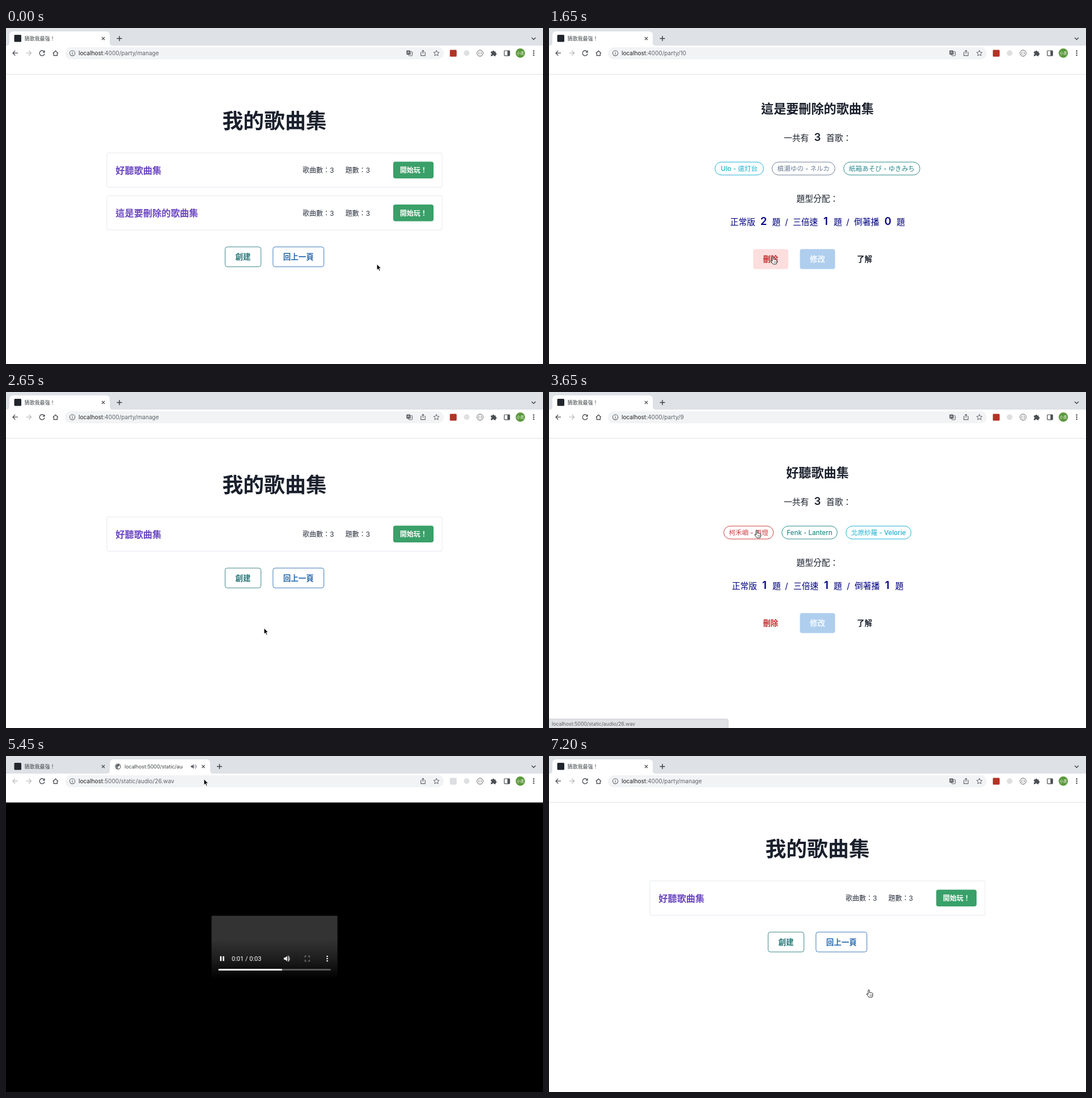
An HTML page that plays this animation: 947 by 592 pixels, repeating every 7.8 s.

```html
<!DOCTYPE html>
<html lang="zh-Hant">
<head>
<meta charset="utf-8">
<title>猜歌我最強！</title>
<style>
html, body { margin: 0; width: 100%; height: 100%; overflow: hidden; background: #fff; }
svg { display: block; width: 100%; height: 100%; }
text { font-family: Inter, "Noto Sans CJK TC", "Noto Sans CJK", sans-serif; white-space: pre; }
.media { font-family: Roboto, sans-serif; }
</style>
</head>
<body>
<svg id="stage" viewBox="0 0 947 592"></svg>
<script>
const LOOP = 7800, STEP = 50;
const INK = '#1a202c', ICON = '#5f6368', TEAL = '#2c7a7b', CYAN = '#1fb2d2';

// ---- drawing helpers ----
const text = (x, y, size, str, fill = INK, weight = 400, anchor = 'start', more = '') =>
  `<text x="${x}" y="${y}" font-size="${size}" fill="${fill}" font-weight="${weight}" text-anchor="${anchor}" ${more}>${str}</text>`;
const mid = (x, y, size, str, fill, weight) => text(x, y, size, str, fill, weight, 'middle');
const rect = (x, y, w, h, r, fill, more = '') =>
  `<rect x="${x}" y="${y}" width="${w}" height="${h}" rx="${r}" fill="${fill}" ${more}/>`;
const box = (x, y, w, h, r, color, width = 1) =>
  rect(x, y, w, h, r, 'none', `stroke="${color}" stroke-width="${width}"`);
const line = (d, color = ICON, width = 1.3, more = '') =>
  `<path d="${d}" fill="none" stroke="${color}" stroke-width="${width}" ${more}/>`;
const fill = (d, color = ICON, more = '') => `<path d="${d}" fill="${color}" ${more}/>`;
const dot = (x, y, r, color, more = '') => `<circle cx="${x}" cy="${y}" r="${r}" fill="${color}" ${more}/>`;
const ring = (x, y, r, color = ICON, width = 1.1) =>
  dot(x, y, r, 'none', `stroke="${color}" stroke-width="${width}"`);
const group = (id, body, more = '') => `<g id="${id}" ${more}>${body}</g>`;
const cross = (x, y, r) => line(`M${x - r} ${y - r}l${2 * r} ${2 * r}m0 ${-2 * r}l${-2 * r} ${2 * r}`, '#3c4043', 1.2);
const dots = (x, y, gap, color) => [-gap, 0, gap].map(d => dot(x, y + d, 1.3, color)).join('');
const tabShape = (x, w) =>
  `M${x - 5} 31Q${x} 31 ${x} 26V13Q${x} 6 ${x + 7} 6H${x + w - 7}Q${x + w} 6 ${x + w} 13V26Q${x + w} 31 ${x + w + 5} 31Z`;

// ---- browser frame ----
function star(x, y, r) {
  let d = '';
  for (let i = 0; i < 10; i++) {
    const a = i * Math.PI / 5, k = i % 2 ? r * .45 : r;
    d += `${i ? 'L' : 'M'}${(x + k * Math.sin(a)).toFixed(1)} ${(y - k * Math.cos(a)).toFixed(1)}`;
  }
  return d + 'Z';
}

const chrome = rect(0, 0, 947, 31, 0, '#dee1e6') +
  fill(tabShape(6, 177), '#fff', 'id="tab"') +
  group('favicon', rect(14.5, 12, 12.5, 12.5, 1.5, '#20262c')) +
  group('loader', line('M20.5 13.5A5 5 0 1 1 15.5 18.5', '#3f7de0', 1.6)) +
  text(32.5, 21.6, 9, '猜歌我最強！', '#3c4043') + cross(171.5, 18.5, 2.6) +
  group('tab2',
    ring(197.5, 18.5, 4.6, ICON, 1.2) + fill('M193.5 17l4-3 3 1-1 3-3 1 1 3-2 1z') +
    text(209, 21.5, 8.9, 'localhost:5000/static/audio/26', '#3c4043') +
    rect(318, 10, 20, 16, 0, 'url(#fade)') +
    group('sound', rect(312, 10, 26, 16, 0, '#fff') + fill('M326 17h2l3-2.6v8.2l-3-2.6h-2z') +
      line('M332.5 16.4q2 2.1 0 4.2m1.4-6q3.6 3.9 0 7.8', ICON, .9)) +
    cross(348, 18.5, 2.6)) +
  group('plus', line('M-4.5 18.5h9m-4.5-4.5v9', '#3c4043', 1.4)) +
  line('M927 17l3.5 3.3 3.5-3.3', '#3c4043', 1.3) +
  rect(0, 31, 947, 51, 0, '#fff') +
  group('back', line('M21 44.2H12m4.2-4.3L12 44.2l4.2 4.3', 'currentColor')) +
  line('M35.5 44.2h9m-4.2-4.3l4.2 4.3-4.2 4.3', '#b9bbbf') +
  line('M67 41.3A4.5 4.5 0 1 0 68 45.5', '#4b4f54', 1.4) + fill('M68.6 39.2v4.3h-4.3z', '#4b4f54') +
  line('M82.8 44.4l4.5-4.2 4.5 4.2M84.2 43.6v4.9h6.2v-4.9', '#4b4f54') +
  rect(104, 34, 668, 21, 10.5, '#f1f3f4') +
  ring(117, 44.3, 4.6) + line('M117 43.6v3.2m0-5.4v1.2', ICON, 1.1) +
  `<text x="128" y="47.9" font-size="10.1" fill="${ICON}"><tspan fill="#202124">localhost</tspan><tspan id="path"></tspan></text>` +
  group('translate', rect(706.2, 39.4, 6.6, 7.6, 1, ICON) + box(710, 41.5, 6.6, 7.4, 1, ICON, 1) +
    line('M711.6 44h3.6m-1.8-1v1q-.5 2-1.8 3m.6-2.2q1 1.4 2.4 2', ICON, .7) +
    line('M708 44.6l1.5-3 1.5 3', '#fff', .8)) +
  line('M733.2 43h-1.6v5.6h7.6V43h-1.6m-2.2 2.6v-6m-2 1.8l2-2 2 2', ICON, 1.1) +
  line(star(759, 44.6, 5.3), ICON, 1, 'stroke-linejoin="round"') +
  rect(782.7, 38.5, 12, 12, 1.5, '#b23325', 'id="tool"') +
  dot(812.3, 44.3, 5, '#dfe0e2') +
  ring(836, 44.3, 5.4, ICON, 1) + line('M834.6 41.6q-2 2.7 0 5.4m2.8-5.4q2 2.7 0 5.4', ICON, .9) +
  fill('M855 41.5h2.6a1.7 1.7 0 1 1 3.4 0h2.6v2.6a1.7 1.7 0 1 1 0 3.4v2h-3a1.5 1.5 0 0 0-3 0H855v-2.6a1.5 1.5 0 0 0 0-3z', '#4b4f54') +
  box(878.7, 40, 9.4, 8.8, 1, '#4b4f54', 1.2) + rect(884.3, 40, 4, 8.8, 0, '#4b4f54') +
  dot(907, 44.3, 8.2, '#5b993c') + mid(907, 46.8, 6.6, '小青', '#fff', 400) +
  dots(930.6, 44.3, 3.7, '#4b4f54') +
  rect(0, 81, 947, 1, 0, '#dfe1e3');

// ---- pages ----
const card = (y, name) => box(177.8, y, 591.2, 60.3, 2, '#e4e8ee') +
  text(193.3, y + 36.6, 16.2, name, '#6b46c1', 600) +
  text(523, y + 35, 12, '歌曲數：3', '#2d3340') + text(598.6, y + 35, 12, '題數：3', '#2d3340') +
  rect(682.8, y + 15.3, 71.2, 29.6, 4, '#3aa069') + mid(718.7, y + 35, 12, '開始玩！', '#fff', 600);

const manage = names => {
  const y = 234.7 + names.length * 75.5;
  return mid(473.5, 177, 36.8, '我的歌曲集', INK, 700) +
    names.map((n, i) => card(220.2 + i * 75.5, n)).join('') +
    box(386.4, y, 63.2, 35, 4, TEAL, .9) + mid(418, y + 22.7, 13.5, '創建', TEAL, 600) +
    box(470.8, y, 89.8, 35, 4, '#2b6cb0', .9) + mid(515.7, y + 22.7, 13.5, '回上一頁', '#2b6cb0', 600);
};

function party(title, tags, counts, xs) {
  const parts = ['正常版', counts[0], '題', '/', '三倍速', counts[1], '題', '/', '倒著播', counts[2], '題'];
  const row = parts.map((p, i) => {
    if (typeof p === 'number') return mid(xs[i], 347, 18.5, p, '#000080', 600);
    return p === '/' ? mid(xs[i], 346.5, 14.7, p, '#000080') : text(xs[i], 347, 14.75, p, '#000080');
  }).join('');
  const pills = tags.map(([x, w, str, color]) =>
    box(x, 236.2, w, 22.8, 11.4, color, 1) + mid(x + w / 2, 252, 11.6, str, color, 500)).join('');
  return mid(473.5, 150.4, 22.1, title, INK, 700) +
    text(414, 199, 14.75, '一共有') + mid(473.5, 199.3, 18.5, 3, INK, 600) + text(489, 199, 14.75, '首歌：') +
    pills + text(436.5, 305.7, 14.75, '題型分配：') + row +
    rect(360, 389.6, 62, 35.2, 4, '#fddede', 'class="hover-del"') + mid(390.8, 412.2, 13.4, '刪除', '#c53030', 600) +
    rect(442.5, 389.6, 62, 35.2, 4, '#afceee') + mid(473.5, 412.2, 13.4, '修改', '#f4f9fe', 600) +
    rect(525.5, 389.6, 62, 35.2, 4, '#edf2f7', 'class="hover-ok"') + mid(556.5, 412.2, 13.4, '了解', INK, 600);
}

const pages = {
  both: { url: ':4000/party/manage', body: manage(['好聽歌曲集', '這是要刪除的歌曲集']) },
  one: { url: ':4000/party/manage', body: manage(['好聽歌曲集']) },
  ten: {
    url: ':4000/party/10',
    body: party('這是要刪除的歌曲集', [
      [292.7, 85.6, 'Ulo - 遠灯台', CYAN],
      [393.3, 111, '槙瀬ゆの - ネルカ', '#718096'],
      [519.7, 134.4, '紙箱あそび - ゆきみち', '#2c8a8a']
    ], [2, 1, 0], [319.5, 378.5, 393.5, 419, 430, 488, 502, 527, 538, 597.5, 613])
  },
  nine: {
    url: ':4000/party/9',
    body: party('好聽歌曲集', [
      [308.3, 87.4, '柯禾嶼 - 雨燈', '#cc4040'],
      [410.7, 97.6, 'Fenk - Lantern', '#2c8a8a'],
      [523.7, 114.8, '北原紗羅 - Velorie', CYAN]
    ], [1, 1, 1], [322.5, 380, 394, 419, 431, 489, 502, 528, 539, 596.5, 610.5])
  },
  audio: {
    url: ':5000/static/audio/26.wav',
    body: group('player', rect(0, 82, 947, 510, 0, '#000') +
      rect(362.5, 281.5, 222, 111, 0, 'url(#shade)') +
      group('spin', line('M487.2 306.7A24.5 24.5 0 0 1 496.5 318.5', '#000', 2.4)) +
      group('play', fill('M377.3 352.6v8.8l7.4-4.4z', '#fff')) +
      group('pause', rect(377.5, 352.8, 2.6, 8.4, 0, '#fff') + rect(382.2, 352.8, 2.6, 8.4, 0, '#fff')) +
      text(398, 361, 11, '0:00', '#fff', 400, 'start', 'class="media" id="clock"') +
      group('volume', fill('M490 355.2h2.4l3.2-3v9.6l-3.2-3H490z', 'currentColor') +
        line('M497 354.5q2 2.5 0 5m.3-7.6q5.6 5.1 0 10.2', 'currentColor', 1.2)) +
      line('M527.3 355.2v-2.7h2.7m2.6 0h2.7v2.7m0 3.6v2.7h-2.7m-2.6 0h-2.7v-2.7', '#6c6c6c', 1.4) +
      dots(566.5, 357, 4, '#fff') +
      rect(374.5, 375, 198.5, 3, 1.5, '#5a5a5a') + rect(374.5, 375, 0, 3, 1.5, '#fff', 'id="played"'))
  }
};

const modal = rect(-189.5, -130, 379, 260, 4, '#fff') +
  ring(0, -67, 31, '#f8bb86', 3) +
  fill('M-2.2-82h4.4l-.9 20h-2.6zm2.2 23a2.3 2.3 0 1 1-.1 0z', '#f8bb86') +
  mid(0, 12, 21.6, '注意', '#545454', 600) + mid(0, 50, 13.2, '確定要刪除歌曲集？', '#545454') +
  rect(-53.5, 76, 49.5, 34, 3, '#7066e0', 'stroke="#b8b3f0" stroke-width="2"') + mid(-28.7, 97.4, 12, '確定', '#fff') +
  rect(4, 76, 49.5, 34, 3, '#6e7881') + mid(28.7, 97.4, 12, '取消', '#fff');

const cursors = {
  arrow: fill('M0 0V10.6L2.5 8.3 4.2 12.2 6 11.4 4.3 7.6H7.6Z', '#000', 'stroke="#fff" stroke-width=".9"'),
  hand: fill('M-1.2 1.2Q-1.2 0 0 0T1.2 1.2V5Q2.2 4.3 3.2 5.1 4.2 4.6 5.1 5.5 6.6 5.2 7 6.7V9Q6.7 11 5.7 13H.2Q-2 10.5-3.8 7.7-3.6 6.2-2.2 7L-1.2 8Z',
    '#fff', 'stroke="#222" stroke-width="1"') + line('M2 8.2v2.6m1.6-2.6v2.6m1.5-2.6v2.6', '#333', .6),
  beam: line('M-2.5-6.5Q0-6.5 0-4.5V4.5Q0 6.5-2.5 6.5M2.5-6.5Q0-6.5 0-4.5M0 4.5Q0 6.5 2.5 6.5', '#444', 1)
};

const stage = document.getElementById('stage');
stage.innerHTML = `<defs>
  <linearGradient id="fade"><stop stop-color="#fff" stop-opacity="0"/><stop offset="1" stop-color="#fff"/></linearGradient>
  <linearGradient id="shade" x2="0" y2="1"><stop offset=".38" stop-color="#333"/><stop offset=".7" stop-color="#1c1c1c"/><stop offset="1"/></linearGradient>
  </defs>` + rect(0, 0, 947, 592, 0, '#fff') + chrome +
  Object.keys(pages).map(k => group('page-' + k, pages[k].body)).join('') +
  group('veil', rect(0, 82, 947, 510, 0, '#000')) + group('modal', modal) +
  group('status', rect(-4, 576, 320, 20, 3, '#dfe1e5', 'stroke="#c4c7cb" stroke-width=".8"') +
    text(5, 587.5, 8.8, '', ICON, 400, 'start', 'id="hint"')) +
  group('cursor', Object.keys(cursors).map(k => group('cur-' + k, cursors[k])).join(''));

// ---- timeline ----
const scenes = [[0, 'both'], [850, 'ten'], [2200, 'one'], [3100, 'nine'], [3700, 'audio'], [5550, 'nine'], [6950, 'one']];
const loads = [[700, 1000], [3000, 3250], [6750, 7100]];
const hints = [[500, 850, ':4000/party/10'], [2950, 3100, ':4000/party/9'],
  [3400, 3700, ':5000/static/audio/26.wav'], [6500, 6950, ':4000/party/manage']];
const moves = [
  [0, 654, 416, 'arrow'], [50, 654, 416, 'arrow'], [350, 329, 326, 'hand'], [900, 329, 326, 'arrow'],
  [1250, 420, 345, 'arrow'], [1550, 395, 403, 'hand'], [1750, 395, 403, 'arrow'], [2000, 453, 428, 'hand'],
  [2600, 453, 428, 'hand'], [2650, 455, 416, 'arrow'], [2950, 235, 250, 'hand'], [3150, 235, 250, 'arrow'],
  [3400, 366.5, 244, 'hand'], [3700, 366.5, 244, 'arrow'], [5250, 366.5, 244, 'arrow'], [5500, 347, 17, 'arrow'],
  [5650, 347, 17, 'arrow'], [6000, 490, 340, 'beam'], [6100, 490, 340, 'beam'], [6450, 556, 406, 'hand'],
  [6850, 560, 409, 'hand'], [7200, 564, 412, 'hand']];
const popScale = [[1750, .7], [1850, 1.05], [1900, .95], [1950, 1], [2050, 1], [2100, .71], [2150, .5]];
const popAlpha = [[2050, 1], [2100, .42], [2150, 0]];
const veilAlpha = [[1700, 0], [1800, .4], [2050, .4], [2100, .08], [2150, 0]];
const tabWidth = [[3700, 40], [3800, 177]];
const playedWidth = [[4350, 0], [4400, 38], [4650, 38], [4900, 105], [5000, 105], [5050, 112.5]];

const latest = (table, t) => table.filter(r => r[0] <= t).pop();
const smooth = p => p * p * (3 - 2 * p);
function at(table, t, col = 1, ease = p => p) {
  if (t <= table[0][0]) return table[0][col];
  const i = table.findIndex(r => r[0] > t);
  if (i < 0) return table[table.length - 1][col];
  const a = table[i - 1], b = table[i];
  return a[col] + (b[col] - a[col]) * ease((t - a[0]) / (b[0] - a[0]));
}

const el = id => document.getElementById(id);
const show = (node, on) => { node.style.display = on ? '' : 'none'; };
const within = (t, a, b) => t >= a && t < b;

function draw(t) {
  const page = latest(scenes, t)[1], audio = page === 'audio';
  Object.keys(pages).forEach(k => show(el('page-' + k), k === page));
  el('path').textContent = pages[page].url;

  const loading = loads.find(([a, b]) => within(t, a, b));
  show(el('favicon'), !loading);
  show(el('loader'), loading);
  el('loader').setAttribute('transform', `rotate(${t * .6} 20.5 18.5)`);
  el('tool').setAttribute('fill', loading || audio ? '#dcdee1' : '#b23325');

  const w = at(tabWidth, t);
  el('tab').setAttribute('d', audio ? tabShape(183, w) : tabShape(6, 177));
  el('plus').setAttribute('transform', `translate(${audio ? 199.5 + w : 200})`);
  show(el('tab2'), audio && t >= 3800);
  show(el('sound'), t >= 4500);
  el('back').style.color = audio ? '#b9bbbf' : '#4b4f54';
  show(el('translate'), !audio);

  const playing = t >= 4400;
  show(el('player'), t >= 3850);
  show(el('spin'), !playing);
  el('spin').setAttribute('transform', `rotate(${(t - 4250) * .5} 473.5 327)`);
  show(el('play'), !playing);
  show(el('pause'), playing);
  el('volume').style.color = playing ? '#fff' : '#757575';
  el('clock').textContent = t >= 4500 ? '0:01 / 0:03' : '0:00';
  el('played').setAttribute('width', at(playedWidth, t));

  document.querySelectorAll('.hover-del').forEach(n => show(n, within(t, 1500, 1800)));
  document.querySelectorAll('.hover-ok').forEach(n => show(n, within(t, 6400, 6950)));

  el('veil').setAttribute('opacity', at(veilAlpha, t));
  show(el('modal'), within(t, 1750, 2150));
  el('modal').setAttribute('opacity', at(popAlpha, t));
  el('modal').setAttribute('transform', `translate(473.5 338) scale(${at(popScale, t)})`);

  const hint = hints.find(([a, b]) => within(t, a, b));
  show(el('status'), hint);
  if (hint) el('hint').textContent = 'localhost' + hint[2];

  const kind = latest(moves, t)[3];
  Object.keys(cursors).forEach(k => show(el('cur-' + k), k === kind));
  el('cursor').setAttribute('transform', `translate(${at(moves, t, 1, smooth)} ${at(moves, t, 2, smooth)})`);
}

const start = performance.now();
function tick() {
  const t = (performance.now() - start) % LOOP;
  draw(Math.floor(t / STEP) * STEP);
  requestAnimationFrame(tick);
}
tick();
</script>
</body>
</html>
```
